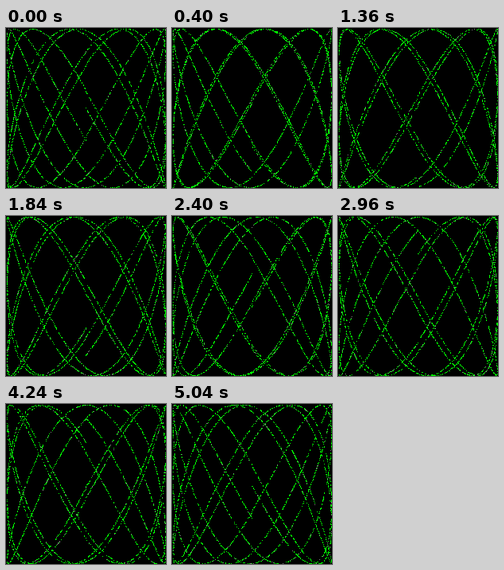
Animation of 201 by 201 pixels, one loop 5.12 s. Source, as an HTML page with a canvas:

```html
<!DOCTYPE html>
<html lang="en">
<head>
<meta charset="utf-8">
<title>Lissajous</title>
<style>
  html, body { margin: 0; width: 100%; height: 100%; overflow: hidden; background: #000; }
  canvas { display: block; width: 201px; height: 201px; image-rendering: pixelated; }
</style>
</head>
<body>
<canvas id="stage" width="201" height="201"></canvas>
<script>
const SIZE = 100, SIDE = 2 * SIZE + 1;
const CYCLES = 5, STEP = 0.001, FREQ = 1.81398086;
const FRAMES = 64, DELAY = 80, PHASE_STEP = 0.1;
const BLACK = 0xff000000, GREEN = 0xff00ff00, GREY = 0xff808080;

const ctx = document.getElementById('stage').getContext('2d');
const image = ctx.createImageData(SIDE, SIDE);
const pixels = new Uint32Array(image.data.buffer);

function seeded(seed) {
  return () => {
    seed = (seed + 0x6d2b79f5) | 0;
    let n = Math.imul(seed ^ (seed >>> 15), 1 | seed);
    n = (n + Math.imul(n ^ (n >>> 7), 61 | n)) ^ n;
    return ((n ^ (n >>> 14)) >>> 0) / 4294967296;
  };
}

// Rounds toward zero, so the curve spans pixels 1 to 200
const toPixel = v => SIZE + Math.trunc(v * SIZE + 0.5);

function draw(frame) {
  const random = seeded(frame * 7919 + 1);
  const phase = frame * PHASE_STEP;
  pixels.fill(BLACK);
  for (let t = 0; t < CYCLES * 2 * Math.PI; t += STEP) {
    const x = toPixel(Math.sin(t));
    const y = toPixel(Math.sin(t * FREQ + phase));
    const r = random();
    pixels[y * SIDE + x] = r < 0.5 ? BLACK : r < 0.96 ? GREEN : GREY;
  }
  ctx.putImageData(image, 0, 0);
}

const start = performance.now();
let shown = -1;

function tick() {
  const frame = Math.floor((performance.now() - start) / DELAY) % FRAMES;
  if (frame !== shown) draw(shown = frame);
  requestAnimationFrame(tick);
}
tick();
</script>
</body>
</html>
```
